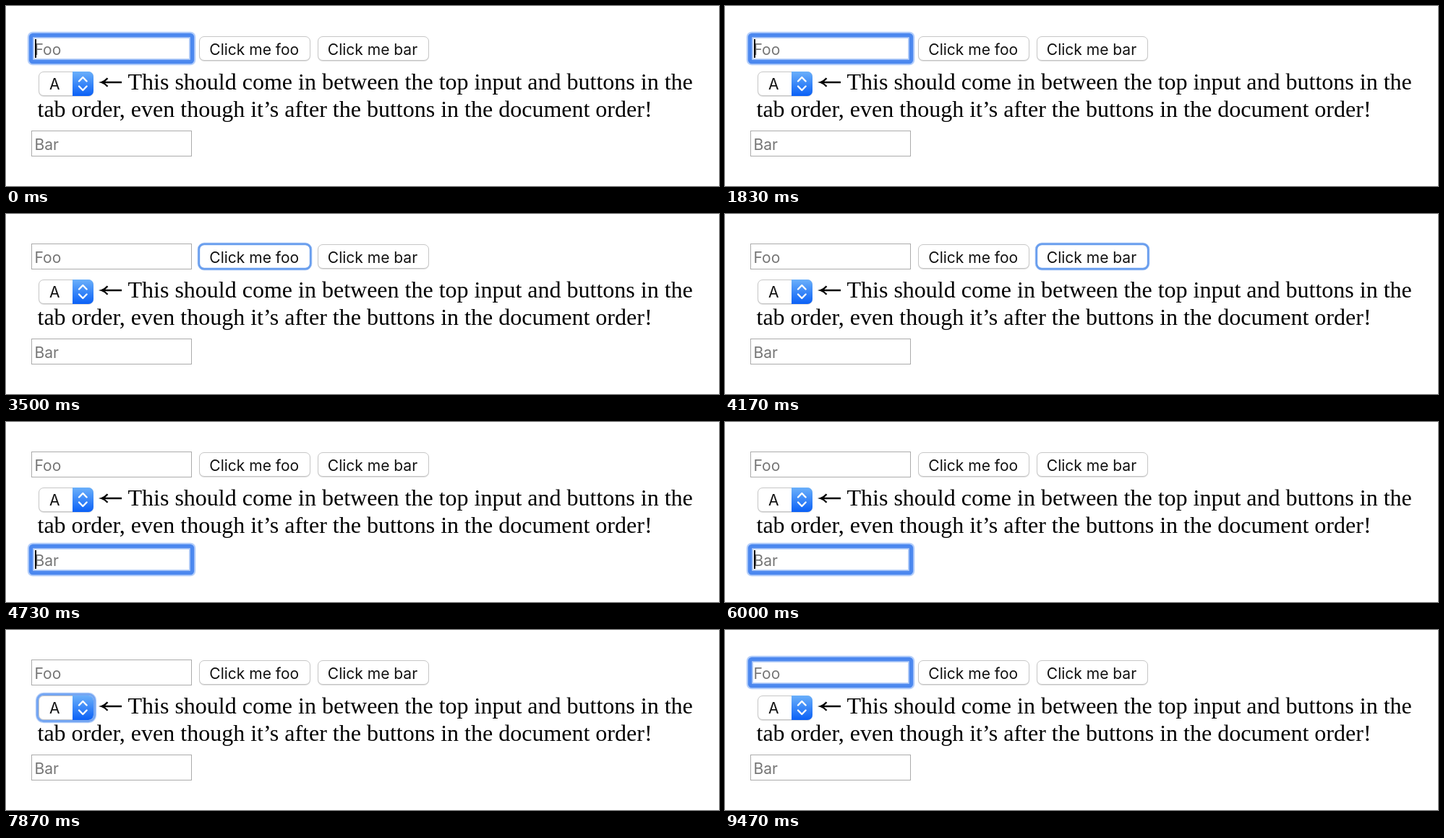
Write an HTML page that moves like this. It is 986 by 250 pixels and loops after 9830 ms.

```html
<!DOCTYPE html>
<html lang="en">
<head>
<meta charset="utf-8">
<title>Tab order</title>
<style>
  html, body { margin: 0; width: 100%; height: 100%; overflow: hidden; background: #fff; }
  svg { display: block; width: 986px; height: 250px; }
  .ui { font: 21px Inter, Roboto, sans-serif; fill: #111; }
  .hint { fill: #757575; }
  .copy { font: 32px "Liberation Serif", "Times New Roman", serif; fill: #000; }
  .field { fill: #fff; stroke: #ababab; }
  .edge { fill: #fff; stroke: #c6c6c6; }
  .shade { fill: #000; opacity: .13; }
  .ring { visibility: hidden; fill: none; }
</style>
</head>
<body>
<svg viewBox="0 0 986 250">
  <defs>
    <linearGradient id="blue" x1="0" y1="0" x2="0" y2="1">
      <stop offset="0" stop-color="#6bb0fa"/>
      <stop offset="1" stop-color="#0a60f6"/>
    </linearGradient>
  </defs>
  <g id="controls"></g>
  <path d="M92 91h22a7 7 0 0 1 7 7v20a7 7 0 0 1-7 7h-22z" fill="url(#blue)"/>
  <path d="M101 104.5l5.3-5.5 5.3 5.5M101 111.5l5.3 5.5 5.3-5.5" fill="none" stroke="#fff"
    stroke-width="2.4" stroke-linecap="round" stroke-linejoin="round"/>
  <g id="rings"></g>
  <g class="ui">
    <text class="hint" x="39.5" y="68">Foo</text>
    <text class="hint" x="39.5" y="200">Bar</text>
    <text x="281.3" y="68">Click me foo</text>
    <text x="444.8" y="68">Click me bar</text>
    <text x="60" y="116">A</text>
  </g>
  <g class="copy">
    <path d="M133 106H160M140.5 100.3Q137 104.5 132 106Q137 107.5 140.5 111.7" fill="none"
      stroke="#000" stroke-width="2.3"/>
    <text x="168.5" y="116">This should come in between the top input and buttons in the</text>
    <text x="43.5" y="154">tab order, even though it’s after the buttons in the document order!</text>
  </g>
  <rect id="caret" x="40" width="2" height="26"/>
</svg>
<script>
  const LOOP = 9830;
  const controls = {
    foo:     { x: 35,  y: 41,  w: 222, h: 36, input: true },
    bar:     { x: 35,  y: 173, w: 222, h: 36, input: true },
    fooBtn:  { x: 267, y: 42,  w: 154, h: 34 },
    barBtn:  { x: 431, y: 42,  w: 154, h: 34 },
    select:  { x: 45,  y: 91,  w: 76,  h: 34, wide: true }
  };

  // Start time, focused control, start of the caret's blink cycle
  const focusSteps = [
    [0, 'foo', -300], [2800, 'select'], [3430, 'fooBtn'], [4070, 'barBtn'],
    [4730, 'bar', 4730], [6070, 'barBtn'], [6670, 'fooBtn'], [7270, 'select'],
    [7970, 'foo', 7970]
  ];

  // Band: inner offset, outer offset, colour
  const inputBands = [[3, 5.3, '#b4cefa'], [-4, -2, '#b4cdf8'], [-2.2, 3.2, '#4c88ef']];
  const buttonBands = [[1.5, 2.4, '#c3d8fa'], [-1.2, 1.7, '#699eee']];
  const selectBands = [[3, 4.2, '#bed5fa'], [0, 3.2, '#75a6f2']];

  const $ = id => document.getElementById(id);

  function add(parent, tag, attrs) {
    const el = document.createElementNS('http://www.w3.org/2000/svg', tag);
    for (const key in attrs) el.setAttribute(key, attrs[key]);
    return parent.appendChild(el);
  }

  function box(parent, c, grow, rx, attrs) {
    return add(parent, 'rect', {
      x: c.x - grow, y: c.y - grow, width: c.w + 2 * grow, height: c.h + 2 * grow,
      rx: Math.max(0, rx + grow), ...attrs
    });
  }

  for (const name in controls) {
    const c = controls[name];
    const radius = c.input ? 2 : 7;
    if (c.input) {
      box($('controls'), c, -0.5, 0, { class: 'field' });
    } else {
      box($('controls'), { ...c, y: c.y + 1 }, 0, 7, { class: 'shade' });
      box($('controls'), c, -0.5, 7, { class: 'edge' });
    }
    c.ring = add($('rings'), 'g', { class: 'ring' });
    const bands = c.input ? inputBands : c.wide ? selectBands : buttonBands;
    for (const [inner, outer, stroke] of bands) {
      box(c.ring, c, (inner + outer) / 2, radius, { stroke, 'stroke-width': outer - inner });
    }
  }

  const show = (el, on) => { el.style.visibility = on ? 'visible' : 'hidden'; };

  function draw(time) {
    const [, name, blink] = focusSteps.filter(step => step[0] <= time).pop();
    for (const key in controls) show(controls[key].ring, key === name);
    const caretOn = blink !== undefined && (time - blink) % 1000 < 500;
    show($('caret'), caretOn);
    if (caretOn) $('caret').setAttribute('y', controls[name].y + 5);
  }

  const start = performance.now();
  function tick() {
    draw((performance.now() - start) % LOOP);
    requestAnimationFrame(tick);
  }
  tick();
</script>
</body>
</html>
```
